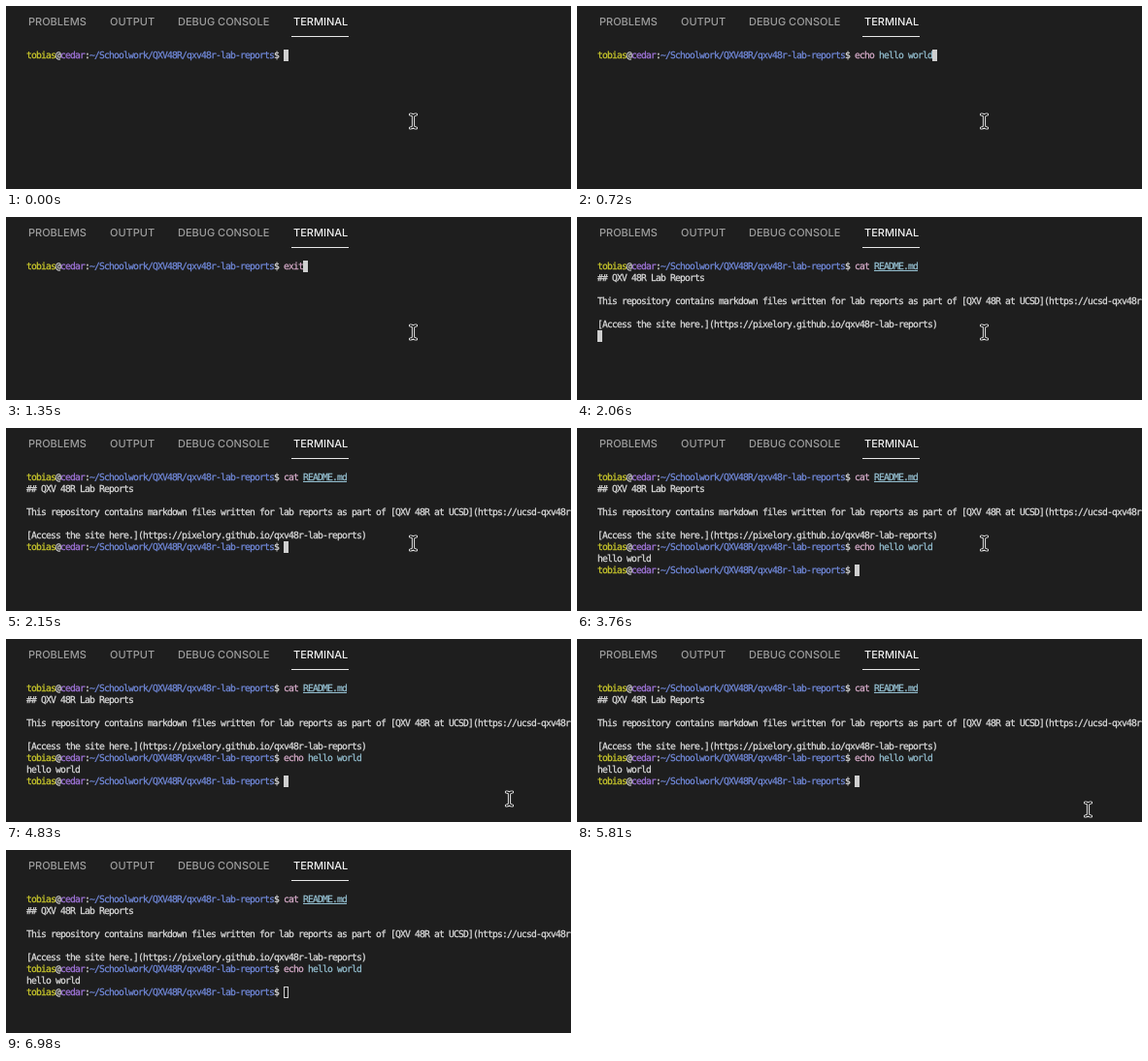
These frames come from a looping animation (582x189 px, 7080 ms). An HTML page:

```html
<!DOCTYPE html>
<html lang="en">
<head>
<meta charset="utf-8">
<title>Terminal</title>
<style>
  html, body { margin: 0; width: 100%; height: 100%; overflow: hidden; background: #1e1e1e; }
  #stage { position: relative; width: 582px; height: 189px; overflow: hidden; background: #1e1e1e; }
  .tab {
    position: absolute; top: 8px; line-height: 16px; white-space: pre;
    font-family: Inter, sans-serif; font-size: 11px; font-weight: 500; color: #9d9d9d;
    text-rendering: geometricPrecision;
  }
  .tab.active { color: #f0f0f0; }
  #underline { position: absolute; left: 294px; top: 31px; width: 59px; height: 1px; background: #e7e7e7; }
  #screen {
    position: absolute; left: 21px; top: 46px; color: #dcdcdc;
    font-family: "DejaVu Sans Mono", monospace; font-size: 9.7px;
    letter-spacing: calc(5px - 1ch); font-variant-ligatures: none;
    text-rendering: geometricPrecision; -webkit-text-stroke: 0.25px;
  }
  .row { height: 12px; line-height: 12px; white-space: pre; }
  .user { color: #cbc92c; }
  .host { color: #a276dc; }
  .path { color: #7189da; }
  .cmd { color: #d6abc9; }
  .arg { color: #94bfd0; }
  .file { color: #94bfd0; text-decoration: underline 1px; text-underline-offset: 1px; }
  .caret {
    display: inline-block; box-sizing: border-box; width: 5px; height: 12px;
    position: relative; top: -1px; vertical-align: top;
    border: 1px solid #cfcfcf; background: #cfcfcf;
  }
  .caret.hollow { background: none; }
  #mouse { position: absolute; left: 0; top: 0; overflow: visible; fill: none; stroke-linecap: round; }
</style>
</head>
<body>
<div id="stage">
  <div class="tab" style="left:23px">PROBLEMS</div>
  <div class="tab" style="left:107px">OUTPUT</div>
  <div class="tab" style="left:177px">DEBUG CONSOLE</div>
  <div class="tab active" style="left:296px">TERMINAL</div>
  <div id="underline"></div>
  <div id="screen"></div>
  <svg id="mouse" width="1" height="1">
    <defs>
      <path id="beam" d="M-3-7Q0-7 0-4.5Q0-7 3-7M0-4.5V4.5M-3 7Q0 7 0 4.5Q0 7 3 7"/>
    </defs>
    <use href="#beam" stroke="#f2f2f2" stroke-width="3.2"/>
    <use href="#beam" stroke="#151515" stroke-width="1.3"/>
  </svg>
</div>
<script>
const LOOP = 7080;
const screen = document.getElementById('screen');
const mouse = document.getElementById('mouse');

const span = (name, text = '') => `<span class="${name}">${text}</span>`;
const caret = span('caret');
const hollow = span('caret hollow');
const prompt = span('user', 'tobias') + '@' + span('host', 'cedar') + ':' +
  span('path', '~/Schoolwork/QXV48R/qxv48r-lab-reports') + '$ ';

const exit = span('cmd', 'exit');
const cat = span('cmd', 'cat') + ' ' + span('file', 'README.md');
const echo = span('cmd', 'echo') + ' ' + span('arg', 'hello world');

const readme = [
  prompt + cat,
  '## QXV 48R Lab Reports',
  '',
  'This repository contains markdown files written for lab reports as part of ' +
    '[QXV 48R at UCSD](https://ucsd-qxv48r-',
  '',
  '[Access the site here.](https://pixelory.github.io/qxv48r-lab-reports)'
];
const greeting = [...readme, prompt + echo, 'hello world'];
const typing = (done, command = '') => [...done, prompt + command + caret];

// [start time, rows]
const screens = [
  [0, typing([])],
  [630, typing([], echo)],
  [900, typing([], cat)],
  [1350, typing([], exit)],
  [1620, typing([], cat)],
  [2060, [...readme, caret]],
  [2150, typing(readme)],
  [2600, typing(readme, cat)],
  [3040, typing(readme, echo)],
  [3670, [...greeting, caret]],
  [3760, typing(greeting)],
  [6980, [...greeting, prompt + hollow]]
];

// [start time, x, y]; no position hides the pointer
const pointer = [
  [0, 419.5, 119],
  [4570, 432, 127], [4660, 462, 143], [4750, 495, 157], [4830, 518.5, 165],
  [4920, 536, 173], [5010, 543, 179], [5100, 534, 178], [5180, 525, 175],
  [5810, 526.5, 176], [5900, 518, 166], [5990, 511.5, 159],
  [6530, 516, 162], [6620, 530, 172], [6710, 546, 183], [6800]
];

const at = (steps, time) => steps.findLast(step => step[0] <= time);

let shown;
function draw(time) {
  const current = at(screens, time);
  if (current !== shown) {
    shown = current;
    screen.innerHTML = current[1].map(row => `<div class="row">${row}</div>`).join('');
  }
  const [, x, y] = at(pointer, time);
  mouse.style.display = x === undefined ? 'none' : 'block';
  if (x !== undefined) mouse.style.transform = `translate(${x}px, ${y}px)`;
}

const start = performance.now();
function tick() {
  draw((performance.now() - start) % LOOP);
  requestAnimationFrame(tick);
}
tick();
</script>
</body>
</html>
```
